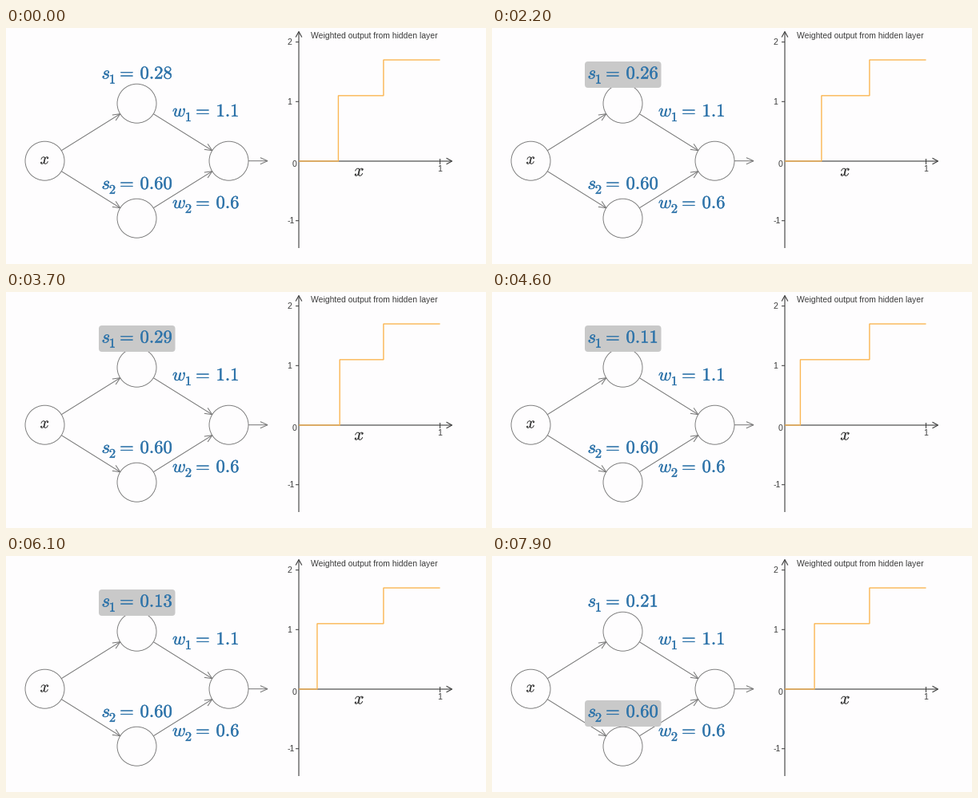
These frames come from a looping animation (600 px wide and 296 px high, 8000 ms). A matplotlib script:

```python
import numpy as np
import matplotlib.pyplot as plt
from matplotlib.animation import FuncAnimation
from matplotlib.patches import Circle, FancyBboxPatch
from matplotlib.patheffects import withStroke

plt.rcParams["mathtext.fontset"] = "cm"
plt.rcParams["font.family"] = "Liberation Sans"

W, H, DPI = 600, 296, 72
FRAMES, STEP = 80, 100
BG, BLUE, INK, GREY, ORANGE = "#fefdfe", "#2f74aa", "#3c3c3c", "#747474", "#fbb754"
RADIUS = 24.5                      # of a neuron
X0, Y0, UX, UY = 366, 167, 176.5, 74.7   # plot origin and unit lengths
S2, W1, W2 = 0.60, 1.1, 0.6


def smooth(p):
    return p * p * (3 - 2 * p)


def slow_down(p):
    return 1 - (1 - p) ** 2


# drags of s1: start and end in ms, value reached, easing
START = 0.28
DRAGS = [(1800, 2700, 0.23, smooth), (3000, 3700, 0.29, smooth),
         (3800, 5600, 0.03, slow_down), (5600, 6500, 0.21, smooth)]

fig = plt.figure(figsize=(W / DPI, H / DPI), dpi=DPI, facecolor=BG)
ax = fig.add_axes([0, 0, 1, 1])
ax.set_xlim(0, W)
ax.set_ylim(H, 0)
ax.axis("off")


def line(xs, ys, color=GREY, lw=1.0, z=1):
    return ax.plot(xs, ys, color=color, lw=lw, zorder=z, snap=False,
                   solid_capstyle="butt", solid_joinstyle="miter")[0]


def arrow(a, b, color=GREY, size=10, spread=0.42, lw=1.0):
    line([a[0], b[0]], [a[1], b[1]], color, lw)
    ang = np.arctan2(a[1] - b[1], a[0] - b[0]) + np.array([-spread, spread])
    wx, wy = b[0] + size * np.cos(ang), b[1] + size * np.sin(ang)
    line([wx[0], b[0], wx[1]], [wy[0], b[1], wy[1]], color, lw)


def link(a, b):
    """Arrow between the rims of two neurons."""
    a, b = np.array(a), np.array(b)
    rim = RADIUS * (b - a) / np.hypot(*(b - a))
    arrow(a + rim, b - rim)


def text(x, y, s, size=10.5, ha="left"):
    return ax.text(x, y, s, size=size, color=INK, ha=ha, va="baseline")


def math(x, y, s, size=22.7, color=BLUE, ha="left", weight=0.35):
    return ax.text(x, y, f"${s}$", size=size, color=color, ha=ha, va="baseline",
                   zorder=5, path_effects=[withStroke(linewidth=weight, foreground=color)])


def label(x, y, name, index, value, sub):
    """Draw 'name_index = value' and return the value's text."""
    math(x, y, name)
    math(x + sub, y + 6, index, 16.5)
    math(x + sub + 9.3, y, "=")
    return math(x + sub + 38.7, y, value)


def backdrop(x, y):
    box = FancyBboxPatch((x + 3, y + 3), 89.5, 27, boxstyle="round,pad=3,rounding_size=4",
                         fc="#c9c9c9", ec="none", zorder=4, alpha=0)
    return ax.add_patch(box)


# network
left, right = (48.5, 166.7), (278.5, 166.7)
hidden = [(163.5, 166.7 + dy) for dy in (-72, 72)]
for centre in [left, right, *hidden]:
    ax.add_patch(Circle(centre, RADIUS, fc=BG, ec=GREY, lw=0.9, zorder=2))
for node in hidden:
    link(left, node)
    link(node, right)
arrow((right[0] + RADIUS, right[1]), (327, right[1]))
math(48.8, 170.5, "x", 20, INK, "center", 0.1)

s1_text = label(119.5, 63.6, "s", "1", f"{START:.2f}", 9.3)
label(119.5, 202, "s", "2", f"{S2:.2f}", 9.3)
label(208, 111, "w", "1", f"{W1}", 15.8)
label(208, 226, "w", "2", f"{W2}", 15.8)
s1_box, s2_box = backdrop(116, 42), backdrop(116, 181)

# plot
arrow((X0, 276), (X0, 4.5), INK, 8, 0.5, 1.1)
arrow((X0, Y0), (557.5, Y0), INK, 8, 0.5, 1.1)
for v in (2, 1, -1):
    y = Y0 - UY * v
    line([X0 - 4, X0], [y, y], INK)
    text(X0 - 14.5, y + 3.5, str(v))
text(X0 - 8, Y0 + 6.5, "0")
line([X0 + UX] * 2, [Y0 - 3, Y0 + 4], INK)
text(X0 + UX, 180.5, "1", ha="center")
text(381, 13.3, "Weighted output from hidden layer", 10.35)
math(441.8, 185.5, "x", 21.5, INK, "center", 0.1)
curve = line([], [], ORANGE, 1.4, 3)


def s1_at(t):
    s = START
    for begin, end, goal, ease in DRAGS:
        s += (goal - s) * ease(np.clip((t - begin) / (end - begin), 0, 1))
    return round(float(s), 2)


def fade(t, begin, span=300):
    return float(np.clip((t - begin) / span, 0, 1))


def draw(i):
    t = i * STEP
    s1 = s1_at(t)
    s1_text.set_text(f"${s1:.2f}$")
    x1, x2 = X0 + UX * s1, X0 + UX * S2
    y1, y2 = Y0 - UY * W1, Y0 - UY * (W1 + W2)
    curve.set_data([X0, x1, x1, x2, x2, X0 + UX], [Y0, Y0, y1, y1, y2, y2])
    s1_box.set_alpha(fade(t, 1000) - fade(t, 7200))
    s2_box.set_alpha(fade(t, 7300))
    return s1_text, curve, s1_box, s2_box


anim = FuncAnimation(fig, draw, frames=FRAMES, interval=STEP, repeat=True,
                     repeat_delay=0, init_func=lambda: draw(0), blit=False)
plt.show()
```
